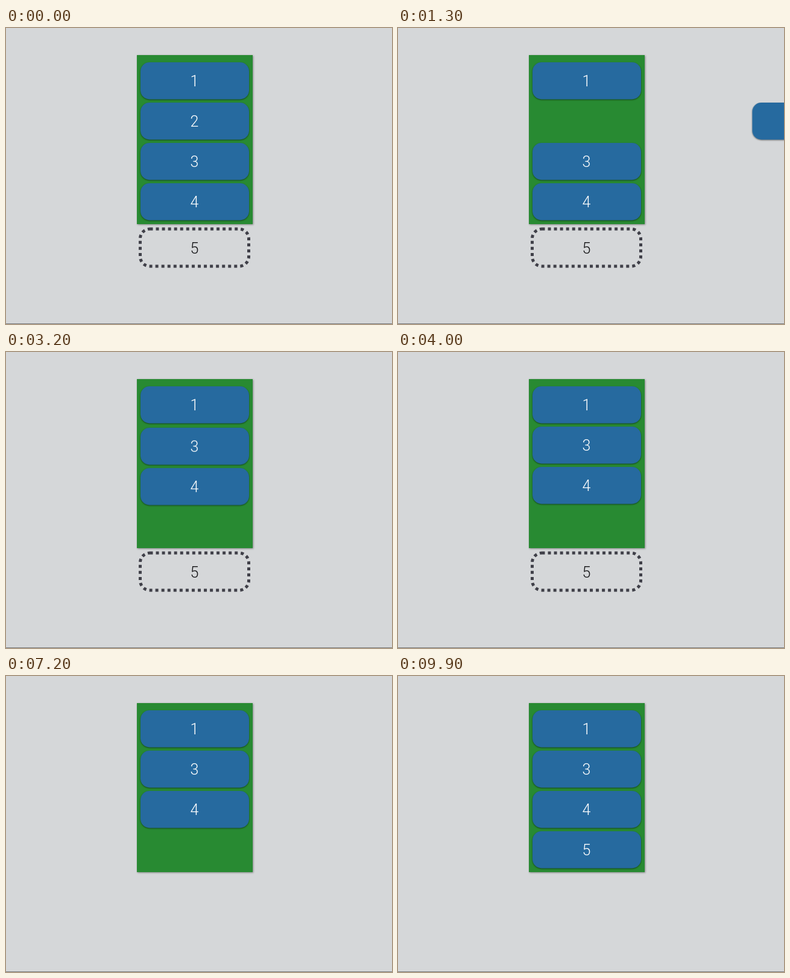
These frames come from a looping animation (640 px wide and 492 px high, 10000 ms). An HTML page:

```html
<!DOCTYPE html>
<html lang="en">
<head>
<meta charset="utf-8">
<title>Reusing cells</title>
<style>
  html, body { margin: 0; width: 100%; height: 100%; overflow: hidden; background: #d5d7d9; }
  svg { display: block; width: 640px; height: 492px; }
  text { font: 300 25px Roboto, "Liberation Sans", sans-serif; text-anchor: middle; fill: #fff; }
  .panel { fill: #288a32; filter: drop-shadow(1.5px 1px 1.5px rgba(0, 0, 0, .4)); }
  .card rect { fill: #266a9f; filter: drop-shadow(.5px 1.5px 1px rgba(0, 0, 0, .5)); }
  .next rect { fill: none; stroke: #404049; stroke-width: 5; stroke-dasharray: 5 5.05; }
  .next text { fill: #141416; }

  /* cubic-bezier with thirds on the time axis is an exact smoothstep */
  .leave, .shift, .enter, .next {
    animation: 10s cubic-bezier(.3333, 0, .6667, 1) infinite both;
  }
  .leave { animation-name: leave; }
  .shift { animation-name: shift; }
  .enter { animation-name: enter; }
  .next { animation-name: vanish; }

  @keyframes leave {
    0%, 6% { transform: translateX(0); }
    16%, 100% { transform: translateX(464px); }
  }
  @keyframes shift {
    0%, 23% { transform: translateY(0); }
    33%, 100% { transform: translateY(-67px); }
  }
  @keyframes vanish {
    0%, 41% { opacity: 1; }
    46%, 100% { opacity: 0; }
  }
  @keyframes enter {
    0%, 74% { transform: translateX(464px); }
    84%, 100% { transform: translateX(0); }
  }
</style>
</head>
<body>
<svg viewBox="0 0 640 492">
  <rect class="panel" x="217" y="45" width="192" height="281"/>
  <g id="cards"></g>
  <g class="next">
    <rect x="222.5" y="334" width="180" height="62" rx="16"/>
    <text x="312.5" y="375">5</text>
  </g>
  <rect y="491" width="640" height="1" fill="#77797b"/>
</svg>
<script>
  const card = (label, row, motion = '') => `
    <g class="card ${motion}">
      <rect x="223" y="${57 + row * 67}" width="180" height="61.5" rx="15"/>
      <text x="312.5" y="${97 + row * 67}">${label}</text>
    </g>`;

  document.getElementById('cards').innerHTML =
    card(1, 0) + card(2, 1, 'leave') + card(3, 2, 'shift') +
    card(4, 3, 'shift') + card(5, 3, 'enter');
</script>
</body>
</html>
```
